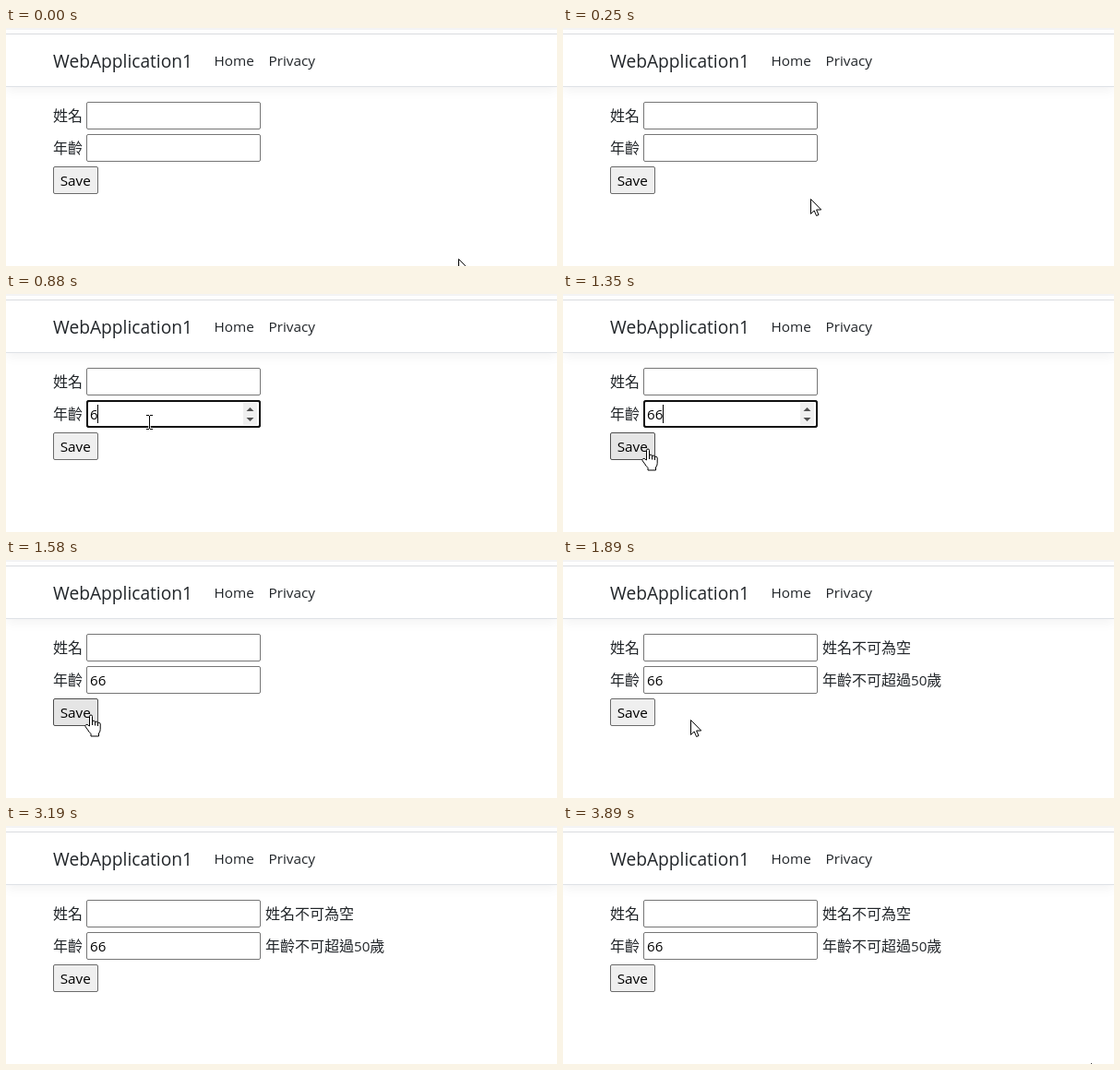
These frames come from a looping animation (597 px wide and 258 px high, 3970 ms). An HTML page:

```html
<!DOCTYPE html>
<html lang="zh-Hant">
<head>
<meta charset="utf-8">
<title>Form validation</title>
<style>
  html, body { margin: 0; width: 100%; height: 100%; overflow: hidden; background: #fff; }
  #stage { position: relative; width: 597px; height: 258px; overflow: hidden; }
  nav {
    position: absolute; left: 0; top: 7px; width: 597px; height: 57px; box-sizing: border-box;
    border-bottom: 1px solid #dee2e6; box-shadow: 0 4px 12px rgba(0, 0, 0, .05); background: #fff;
  }
  .edge { position: absolute; left: 0; width: 597px; background: #f3f3f4; }
  svg { position: absolute; left: 0; top: 0; }
  text { font: 15.3px "Open Sans", "Noto Sans", sans-serif; fill: #212529; }
  text.brand { font-size: 19.2px; }
  text.cjk { font: 16px "Noto Sans CJK TC", "Noto Sans CJK JP", "Noto Sans CJK", sans-serif; }
  text.value { font-size: 15.1px; fill: #000; }
  tspan { font: 15.1px "Open Sans", "Noto Sans", sans-serif; }
  .box { fill: #fff; stroke: #767676; }
  .box.hover { stroke: #4f4f4f; }
  .button { fill: #efefef; stroke: #6b6b6b; }
  .button.hover { fill: #e5e5e5; stroke: #4f4f4f; }
  .button.pressed { fill: #f5f5f5; stroke: #8d8d8d; }
  .pointer { fill: #fff; stroke: #000; stroke-linejoin: round; }
</style>
</head>
<body>
<div id="stage">
  <nav></nav>
  <div class="edge" style="top:0;height:2px"></div>
  <div class="edge" style="top:6px;height:1px;background:#dadce0"></div>
  <svg width="597" height="258" viewBox="0 0 597 258">
    <text class="brand" x="51" y="43">WebApplication1</text>
    <text x="225.5" y="41">Home</text>
    <text x="284.5" y="41">Privacy</text>

    <text class="cjk" x="51" y="101">姓名</text>
    <rect class="box" x="87.5" y="80.5" width="188" height="29" rx="1.5"/>

    <text class="cjk" x="51" y="136">年齡</text>
    <rect id="age" class="box" x="87.5" y="115.5" width="188" height="29" rx="1.5"/>
    <rect id="ring" x="88" y="116" width="187" height="28" rx="2" fill="none" stroke="#101010" stroke-width="2"/>
    <g id="spinner">
      <rect x="257" y="118" width="15" height="24" fill="#efefef"/>
      <path d="M260.5 127h8l-4-4zM260.5 134h8l-4 4z" fill="#505050"/>
    </g>
    <text id="value" class="value" x="91" y="136"></text>
    <rect id="caret" y="120" width="1" height="20"/>

    <rect id="save" class="button" x="51.5" y="150.5" width="48" height="29" rx="1.5"/>
    <text x="58.7" y="171" style="fill:#000">Save</text>

    <g id="errors">
      <text class="cjk" x="281" y="101">姓名不可為空</text>
      <text class="cjk" x="281" y="136">年齡不可超過<tspan>50</tspan>歲</text>
    </g>

    <path id="arrow" class="pointer" d="M.5 .5V16.5L4.2 13L6.6 18.5L9 17.5L6.6 12H11.7Z"/>
    <g id="ibeam" fill="none">
      <path d="M-3.5 -7.5H3.5M.5 -7.5V7.5M-3.5 7.5H3.5" stroke="#fff" stroke-width="2.5"/>
      <path d="M-3 -7.5H0M1 -7.5H4M.5 -7V7M-3 7.5H0M1 7.5H4" stroke="#000"/>
    </g>
    <g id="hand">
      <path class="pointer" d="M-1.5 12V1.5Q-1.5 0 0 0T1.5 1.5V7.5Q1.8 6 3.2 6.2T4.6 8Q5 6.9 6.2 7.1T7.5 9Q8 8 9 8.2T10.2 10V15.5Q10.2 18 8.5 20V23H0V20.5Q-2 18.5 -3.5 16L-5.8 12.8Q-6.6 11.2 -5.2 10.5T-2.8 11.3Z"/>
      <path d="M1.5 7V11M4.6 8V11.5M7.5 9V12" stroke="#000" fill="none"/>
    </g>
  </svg>
</div>
<script>
const LOOP = 3970;

// Pointer steps: start time, shape, x, y
const pointerSteps = [
  [0, "arrow", 490, 250], [70, "arrow", 405, 232], [140, "arrow", 330, 208],
  [210, "arrow", 268, 185], [280, "arrow", 222, 166], [350, "arrow", 190, 152],
  [420, "ibeam", 172, 144], [490, "ibeam", 162, 141], [560, "ibeam", 157, 139],
  [650, "ibeam", 157, 141], [710, "ibeam", 157, 139], [880, "ibeam", 155, 139],
  [1010, "ibeam", 150, 143], [1090, "arrow", 130, 152], [1170, "arrow", 110, 162],
  [1260, "hand", 95, 167], [1350, "hand", 92, 168],
  [1810, "arrow", 118, 172], [1890, "arrow", 138, 173],
  [2820, "arrow", 140, 174], [2880, "arrow", 155, 181], [2960, "arrow", 195, 199],
  [3040, "arrow", 260, 222], [3110, "arrow", 351, 250], [3190, "none", 0, 0],
  [3890, "arrow", 572, 257]
];
const valueSteps = [[0, ""], [880, "6"], [950, "66"]];

const el = id => document.getElementById(id);
const stepAt = (steps, t) => steps.filter(step => step[0] <= t).pop();
const show = (id, on) => { el(id).style.display = on ? "" : "none"; };

function draw(t) {
  const [, shape, x, y] = stepAt(pointerSteps, t);
  for (const id of ["arrow", "ibeam", "hand"]) show(id, id === shape);
  if (shape !== "none") el(shape).setAttribute("transform", `translate(${x} ${y})`);

  const value = stepAt(valueSteps, t)[1];
  const focused = t >= 650 && t < 1500;
  const overAge = shape === "ibeam";
  el("value").textContent = value;
  el("age").classList.toggle("hover", overAge);
  show("ring", focused);
  show("spinner", focused || overAge);
  show("caret", focused);
  el("caret").setAttribute("x", 91 + value.length * 8.6 | 0);

  el("save").classList.toggle("hover", shape === "hand");
  el("save").classList.toggle("pressed", t >= 1500 && t < 1580);
  show("errors", t >= 1730);
}

const start = performance.now();
function tick() {
  draw((performance.now() - start) % LOOP);
  requestAnimationFrame(tick);
}
tick();
</script>
</body>
</html>
```
